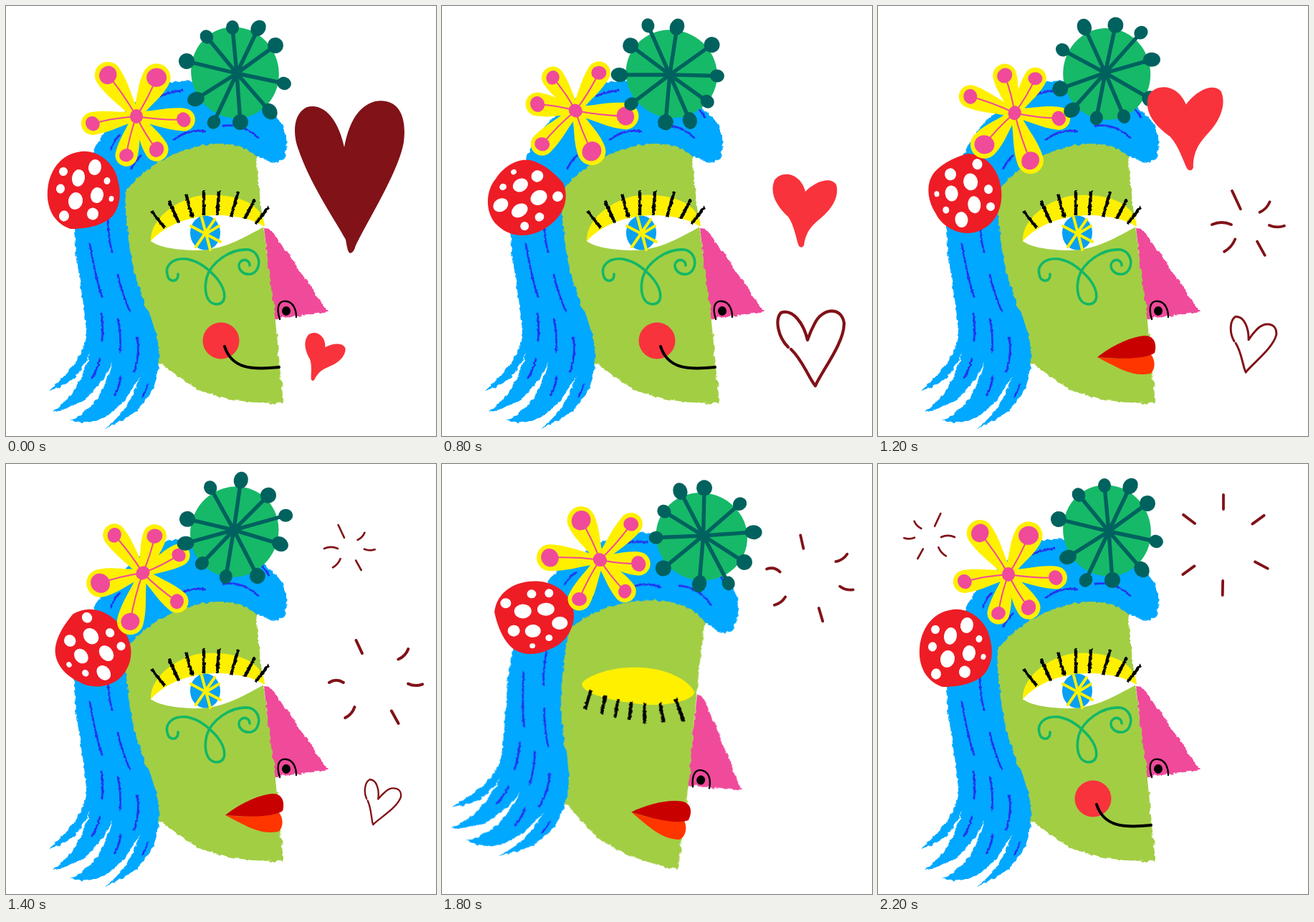
Recreate the animation shown at these times as an HTML page. Size 600 by 600 pixels, loop 2400 ms.

```html
<!DOCTYPE html>
<html lang="en">
<head>
<meta charset="utf-8">
<title>Flower head</title>
<style>
html, body { margin: 0; width: 100%; height: 100%; overflow: hidden; background: #fff; }
svg { display: block; width: 100vw; height: 100vh; }
.line { fill: none; stroke-linecap: round; stroke-linejoin: round; }
</style>
</head>
<body>
<svg viewBox="0 0 600 600">
  <defs>
    <filter id="rough" x="-5%" y="-5%" width="110%" height="110%" color-interpolation-filters="sRGB">
      <feTurbulence type="fractalNoise" baseFrequency=".13" numOctaves="2" seed="4"/>
      <feDisplacementMap in="SourceGraphic" scale="6" xChannelSelector="R" yChannelSelector="G"/>
    </filter>
    <filter id="ink" filterUnits="userSpaceOnUse" x="0" y="0" width="600" height="600" color-interpolation-filters="sRGB">
      <feTurbulence type="fractalNoise" baseFrequency=".25" numOctaves="2" seed="9"/>
      <feDisplacementMap in="SourceGraphic" scale="3.5" xChannelSelector="R" yChannelSelector="G"/>
    </filter>
  </defs>
  <g id="scene">
    <path fill="#00a8ff" filter="url(#rough)" d="M118 214C126 180 160 150 200 118C225 103 255 102 280 108
      C330 118 362 138 378 156C392 172 394 196 390 207C386 218 376 220 366 216L350 209L300 300L205 440
      C213 460 216 478 213 505C210 535 190 572 138 589C162 572 176 550 187 518C165 555 145 575 120 580
      C108 582 98 582 90 578C118 566 138 540 149 497C128 540 105 560 65 566C92 548 108 520 117 484
      C105 512 90 528 60 537C85 515 108 488 112 460C113 430 98 370 95 308C95 270 108 240 118 214Z"/>
    <g id="strands" class="line" stroke="#2433f0" stroke-width="2.8" filter="url(#ink)"></g>
    <path fill="#f04a9b" filter="url(#rough)" d="M360 310L369 311L449 426L374 437Z"/>
    <path fill="#a2ce44" filter="url(#rough)" d="M349 209C355 290 372 400 377 450L387 554C340 555 300 549 270 536
      C245 522 230 509 213 498C215 478 210 455 200 428C180 390 169 340 166 263C180 232 240 193 300 192
      C325 193 340 202 349 209Z"/>
    <g class="line" stroke="#000" stroke-width="2.4">
      <path d="M382 437C376 418 382 411 391 412C401 413 405 424 405 434"/>
    </g>
    <ellipse cx="391" cy="425.500" rx="6" ry="6.500"/>
    <g id="open">
      <path fill="#fff000" d="M202 329C200 300 232 273 268 265C305 260 358 268 361 307Z"/>
      <path fill="#fff" d="M202 328C228 300 268 291 302 292C330 294 350 300 360 308C330 324 302 342 262 341C235 340 212 336 202 328Z"/>
      <ellipse cx="278" cy="316.500" rx="21" ry="24" fill="#08a0f2"/>
      <path class="line" stroke="#fff000" stroke-width="4" d="M273 295L285 340M258 307L299 329M291 298L265 336M279 318L297 307"/>
      <path class="line" stroke="#12b766" stroke-width="3.6" d="M240 374C241 385 229 386 226 378C220 362 233 351 252 353
        C270 356 284 368 295 381C308 398 309 417 292 416C279 414 276 396 280 379C286 358 313 338 338 340
        C357 343 357 370 342 374C327 376 321 362 328 356C334 352 340 356 340 362"/>
    </g>
    <path id="shut" fill="#fff000" d="M200 329C206 315 250 288 300 288C328 288 353 299 356 309C354 320 320 339 275 341C238 345 199 342 200 329Z"/>
    <g filter="url(#ink)"><g id="lashUp"></g><g id="lashDown"></g></g>
    <g id="smile">
      <circle cx="300" cy="467" r="25.500" fill="#f8333c"/>
      <path class="line" stroke="#000" stroke-width="4" d="M305 475C315 506 342 508 381 504"/>
    </g>
    <g id="lips">
      <path fill="#ff3600" d="M306 490C340 494 365 490 380 485C388 494 387 508 380 513C355 518 335 505 306 490Z"/>
      <path fill="#c90000" d="M306 490C325 475 350 462 372 460C387 460 389 474 386 484C376 491 350 494 306 490Z"/>
    </g>
    <g id="cap"></g>
    <g id="daisy"></g>
    <g id="ball"></g>
    <path id="dark" fill="#801218" d="M-8-43C-16-80-35-105-60-99C-80-90-80-60-72-40C-55 10-20 60-6 86C-4 98-3 103 0 105Q5 105 8 94
      C30 50 68-10 75-50C80-90 65-112 35-107C10-100-2-75-8-43Z"/>
    <path id="outline" class="line" stroke="#801218" stroke-width="4.200" d="M-29 1C-12 17-4 42 5 52C12 34 46-8 45-36
      C41-60 14-56 4-35C-2-24-5-15-6-12C-11-34-26-56-43-50C-52-40-47-16-33-2"/>
    <path id="red" fill="#f8333c" d="M1-26C-6-53-32-56-42-42C-50-23-38-5-23 9C-14 22-12 40-8 50Q-4 54-1 49
      C2 25 16 17 27 7C42-7 48-23 44-36C36-48 14-40 1-26Z"/>
    <path id="rays" class="line" stroke="#801218" stroke-width="3.800"/>
    <path id="rays2" class="line" stroke="#801218" stroke-width="3.800"/>
  </g>
</svg>
<script>
const STEP = 200, COUNT = 12, TURN = 360 / 11;
const $ = id => document.getElementById(id);
const polar = (deg, r) => [r * Math.cos(deg * Math.PI / 180), r * Math.sin(deg * Math.PI / 180)];
const dot = (x, y, rx, ry, fill, rot = 0) =>
  `<ellipse cx="${x}" cy="${y}" rx="${rx}" ry="${ry}" fill="${fill}" transform="rotate(${rot} ${x} ${y})"/>`;
const lines = d => `<path d="${d}" class="line"/>`;

$('strands').innerHTML = lines(`M117 332Q124 375 134 406M142 297Q142 320 148 343M156 375Q162 402 173 426
  M133 429Q136 447 134 467M156 437Q161 458 159 482M183 463Q187 485 179 510M131 493Q127 508 120 519
  M160 517Q158 532 152 543M198 528L191 545M246 118Q230 119 215 126M278 175Q254 171 234 187
  M304 167Q332 164 352 184M355 140Q362 147 367 155M188 209Q180 216 175 227M159 180Q150 188 146 201`);

const lash = d => `<path d="${d}" fill="none" stroke="#000" stroke-width="4.400"/>`;
$('lashUp').innerHTML = lash(`M203 286L222 310M227 272L241 302M251 262L260 295M276 258L276 292
  M297 258L295 292M324 259L314 294M347 270L333 297M367 280L348 304`);
$('lashDown').innerHTML = lash(`M214 336L212 364M235 339L236 365M254 340L255 366M273 340L275 365
  M291 337L297 365M312 333L323 358M332 322L350 351`);

// red cap with white spots
$('cap').innerHTML = `<path fill="#ee1c25" d="M105 203C130 200 153 222 156 243C163 266 157 290 140 300
  C125 309 105 311 90 311C72 305 60 290 58 268C56 240 70 207 105 203Z"/>` +
  [[80, 231, 6, 6], [124, 225, 9, 11], [101, 240, 9, 12], [141, 244, 4.5, 5], [76, 255, 6, 6.5], [127, 264, 9, 11],
   [97, 272, 10, 12], [147, 269, 3.5, 4], [81, 293, 7, 7.5], [121, 290, 8, 8.5]]
    .map(s => dot(...s, '#fff', 10)).join('');

// daisy: angle, length, dot size
const petals = [[-124.6, 70, 12.5], [-62.6, 61, 13.5], [4, 66, 10], [58.7, 54, 10.5], [104.5, 56, 9.5], [170.7, 62, 10]];
const place = (deg, inner) => `<g transform="translate(182 154) rotate(${deg})">${inner}</g>`;
$('daisy').innerHTML =
  petals.map(([a, l, r]) => {
    const w = r + 6;
    return place(a, `<path fill="#fff000" d="M-4-6C${l * .35}-8 ${l * .6} ${-w} ${l} ${-w}
      A${w} ${w} 0 0 1 ${l} ${w}C${l * .6} ${w} ${l * .35} 8-4 6Z"/>`);
  }).join('') +
  petals.map(([a, l, r]) => place(a, `<path class="line" stroke="#f04a9b" stroke-width="2" d="M0 0Q${l / 2} 3 ${l} 0"/>` +
    dot(l, 0, r + .5, r - .5, '#f04a9b', 60))).join('') + dot(182, 154, 9, 10, '#f04a9b');

// green ball with knobs
const knobs = [[316, 30], [352, 31], [376, 55], [388, 108], [368, 147], [327, 162], [290, 162], [265, 130], [252, 77], [280, 43]];
$('ball').innerHTML = dot(319.5, 93, 61, 64, '#16b968', -20) +
  `<path class="line" stroke="#00625f" stroke-width="5.400" d="${knobs.map(k => 'M322 94L' + k).join('')}"/>` +
  knobs.map(([x, y], i) => dot(x, y, 9 + i * 7 % 3, 10 + i * 5 % 3, '#00625f', i * 36)).join('');

// rays: angle, inner and outer radius, bend
const soft = [[-115, 24, 52, 0], [-46, 24, 44, 2], [180, 23, 50, 3], [2, 30, 51, 2], [131, 27, 50, -2], [61, 27, 49, 0]];
const firm = [[-90, 14, 66, 0], [-36, 23, 61, 0], [28, 16, 59, 0], [91, 15, 56, 0], [144, 18, 59, 0], [-143, 29, 65, 0]];
const far = (set, r0, r1) => set.map(([a, , , b]) => [a, r0, r1, b]);
const softFar = far(soft, 43, 62), firmFar = far(firm, 50, 70);
const rayPath = set => set.map(([a, r0, r1, bend]) => {
  const [x, y] = polar(a, (r0 + r1) / 2), [nx, ny] = polar(a + 90, bend * 2);
  return `M${polar(a, r0)}Q${[x + nx, y + ny]} ${polar(a, r1)}`;
}).join('');

// per step: x, y, scale, rotation
const dark = { 0: [480, 240, 1, 0], 1: [480, 240, .67, 0], 2: [481, 239, .335, 0] };
const red = [[440, 492, .64, 17], [497, 458, .74, 12], [548, 409, .83, 8], [552, 347, .92, 3],
  [506, 285, 1, 0], [472, 228, 1.09, -4], [433, 168, 1.18, -8]];
const outline = { 3: [516, 478, 1.12, -6], 4: [516, 478, 1, 0], 5: [518, 477, .85, 7], 6: [519, 475, .7, 14.6], 7: [520, 475, .56, 21] };
// per step: rays, x, y, x scale, y scale
const rays = { 5: [soft, 516, 305, .7], 6: [soft, 516, 305, 1], 7: [softFar, 516, 305, 1.05],
  8: [soft, 479, 118, 1], 9: [softFar, 515, 162, 1], 11: [soft, 72, 102, -.7, .7] };
rays[9][1] = 479; rays[9][2] = 118;
const rays2 = { 7: [soft, 479, 118, .7], 8: [firm, 516, 305, 1], 10: [firm, 482, 113, 1], 11: [firmFar, 482, 113, 1] };
const tilt = { 9: 12.5, 10: 6.25 };

const show = (id, on) => $(id).setAttribute('display', on ? 'inline' : 'none');
const put = (id, p) => {
  show(id, p);
  if (p) $(id).setAttribute('transform', `translate(${p[0]} ${p[1]}) rotate(${p[3]}) scale(${p[2]})`);
};
const putRays = (id, p) => {
  show(id, p);
  if (!p) return;
  const [set, x, y, sx, sy = sx] = p;
  $(id).setAttribute('d', rayPath(set));
  $(id).setAttribute('transform', `translate(${x} ${y}) scale(${sx} ${sy})`);
};
const spin = (id, deg, x, y) => $(id).setAttribute('transform', `rotate(${deg} ${x} ${y})`);

function draw(n) {
  spin('scene', tilt[n] || 0, 305, 297);
  spin('daisy', n * TURN, 186, 151);
  spin('ball', n * TURN, 319.5, 94);
  spin('cap', -n * TURN, 115, 261);
  const shut = n >= 8 && n <= 10, kiss = n >= 6 && n <= 10;
  show('open', !shut);
  show('lashUp', !shut);
  show('shut', shut);
  show('lashDown', shut);
  show('smile', !kiss);
  show('lips', kiss);
  put('dark', dark[n]);
  put('red', red[n]);
  put('outline', outline[n]);
  putRays('rays', rays[n]);
  putRays('rays2', rays2[n]);
}

const start = performance.now();
let last = 0;
function tick() {
  const n = Math.floor((performance.now() - start) / STEP) % COUNT;
  if (n !== last) draw(last = n);
  requestAnimationFrame(tick);
}
draw(0);
requestAnimationFrame(tick);
</script>
</body>
</html>
```
